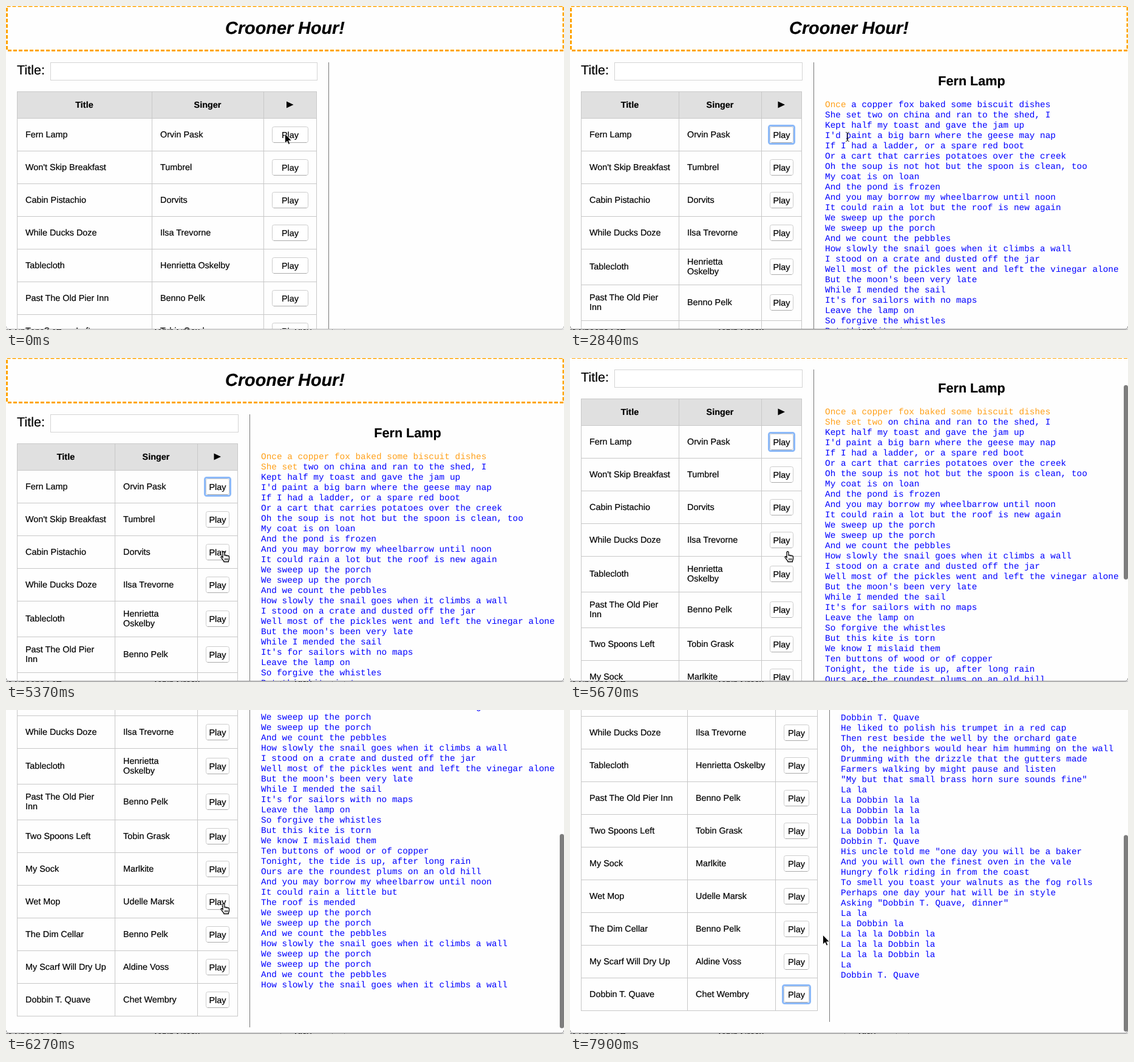
An HTML page for the animation above (8000 ms loop, 919 by 535 pixels).

```html
<!DOCTYPE html>
<html lang="en">
<head>
<meta charset="utf-8">
<title>Crooner Hour!</title>
<style>
  html, body { margin: 0; width: 100%; height: 100%; overflow: hidden; background: #fefefe; }
  svg { display: block; }
  text { font: 14.4px "Liberation Sans", sans-serif; text-rendering: geometricPrecision; stroke: #000; stroke-width: .2; }
  .banner { font-size: 28.8px; font-weight: bold; font-style: italic; }
  .label { font-size: 21.6px; }
  .heading { font-size: 21.6px; font-weight: bold; }
  .th { font-weight: bold; }
  .mid { text-anchor: middle; }
  .lyric { font-family: "Liberation Mono", monospace; fill: #00f; stroke: none; white-space: pre; }
  .sung { fill: #ffa019; }
</style>
</head>
<body>
<svg id="stage" width="919" height="535"></svg>
<script>
const LOOP = 8000, VIEW = 533;

// "|" marks where a cell may wrap in the narrow layout
const songs = [
  ["Fern Lamp", "Orvin Pask"],
  ["Won't Skip Breakfast", "Tumbrel"],
  ["Cabin Pistachio", "Dorvits"],
  ["While Ducks Doze", "Ilsa Trevorne"],
  ["Tablecloth", "Henrietta|Oskelby"],
  ["Past The Old Pier|Inn", "Benno Pelk"],
  ["Two Spoons Left", "Tobin Grask"],
  ["My Sock", "Marlkite"],
  ["Wet Mop", "Udelle Marsk"],
  ["The Dim Cellar", "Benno Pelk"],
  ["My Scarf Will Dry Up", "Aldine Voss"],
  ["Dobbin T. Quave", "Chet Wembry"],
];

const porch = "We sweep up the porch", chorus = [porch, porch, "And we count the pebbles",
  "How slowly the snail goes when it climbs a wall"];
const lampLyrics = [
  "Once a copper fox baked some biscuit dishes",
  "She set two on china and ran to the shed, I",
  "Kept half my toast and gave the jam up",
  "I'd paint a big barn where the geese may nap",
  "If I had a ladder, or a spare red boot",
  "Or a cart that carries potatoes over the creek",
  "Oh the soup is not hot but the spoon is clean, too",
  "My coat is on loan",
  "And the pond is frozen",
  "And you may borrow my wheelbarrow until noon",
  "It could rain a lot but the roof is new again",
  ...chorus,
  "I stood on a crate and dusted off the jar",
  "Well most of the pickles went and left the vinegar alone",
  "But the moon's been very late",
  "While I mended the sail",
  "It's for sailors with no maps",
  "Leave the lamp on",
  "So forgive the whistles",
  "But this kite is torn",
  "We know I mislaid them",
  "Ten buttons of wood or of copper",
  "Tonight, the tide is up, after long rain",
  "Ours are the roundest plums on an old hill",
  "And you may borrow my wheelbarrow until noon",
  "It could rain a little but",
  "The roof is mended",
  ...chorus, ...chorus,
];

const repeat = (n, line) => Array(n).fill(line);
const hero = songs[11][0];
const heroLyrics = [
  ...repeat(11, "La Dobbin la la"),
  hero,
  "He liked to polish his trumpet in a red cap",
  "Then rest beside the well by the orchard gate",
  "Oh, the neighbors would hear him humming on the wall",
  "Drumming with the drizzle that the gutters made",
  "Farmers walking by might pause and listen",
  '"My but that small brass horn sure sounds fine"',
  "La la",
  ...repeat(4, "La Dobbin la la"),
  hero,
  'His uncle told me "one day you will be a baker',
  "And you will own the finest oven in the vale",
  "Hungry folk riding in from the coast",
  "To smell you toast your walnuts as the fog rolls",
  "Perhaps one day your hat will be in style",
  `Asking "${hero}, dinner"`,
  "La la",
  "La Dobbin la",
  ...repeat(3, "La la la Dobbin la"),
  "La",
  hero,
];

const layouts = [
  { cols: [18, 240, 424, 511], button: 60, height: 870 },
  { cols: [18, 179, 315, 381], button: 39, height: 880, wrap: true, playing: 0, lyrics: lampLyrics },
  { cols: [18, 193, 338, 407], button: 42, height: 870, playing: 11, lyrics: heroLyrics },
];

const text = (x, y, str, cls = "") => `<text x="${x}" y="${y}" class="${cls}">${str}</text>`;
const rect = (x, y, w, h, attrs) => `<rect x="${x}" y="${y}" width="${w}" height="${h}" ${attrs}/>`;
const path = (d, color, attrs = "") => `<path d="${d}" fill="none" stroke="${color}" ${attrs}/>`;

function cell(x, mid, str, wrap) {
  const lines = wrap ? str.split("|") : [str.replace("|", " ")];
  return lines.map((line, i) => text(x, mid + 5 + 16 * i - 8 * (lines.length - 1), line)).join("");
}

function playButton(cx, mid, w, focused) {
  const x = Math.round(cx - w / 2), y = mid - 13;
  return (focused ? rect(x - 1.5, y - 1.5, w + 3, 30, 'rx="3" fill="none" stroke="#8cb9f8" stroke-width="3"') : "")
    + rect(x + .5, y + .5, w - 1, 26, 'rx="3" fill="#fff" stroke="#ccc"')
    + path(`M${x + 3} ${y + 26.5}h${w - 6}`, "#aaa")
    + text(x + w / 2, mid + 6, "Play", "mid");
}

function table({ cols, button, wrap, playing }) {
  const [a, b, c, d] = cols, cx = (c + d) / 2;
  let y = 185, lines = `M${a} 141.5H${d + 1}M${a} 185.5H${d + 1}`;
  let out = rect(a, 141, d - a, 44, 'fill="#e0e0e0"')
    + text((a + b) / 2, 168, "Title", "th mid") + text((b + c) / 2, 168, "Singer", "th mid")
    + `<path d="M${cx - 5.5} 157.5l11.5 5.5-11.5 5.5z"/>`;
  songs.forEach(([title, singer], i) => {
    const h = wrap && (title + singer).includes("|") ? 59 : 54, mid = y + Math.floor(h / 2);
    out += cell(a + 14, mid, title, wrap) + cell(b + 14, mid, singer, wrap)
      + playButton(cx, mid, button, i === playing);
    y += h;
    lines += `M${a} ${y + .5}H${d + 1}`;
  });
  cols.forEach(x => lines += `M${x + .5} 141V${y}`);
  return out + path(lines, "#c8c8c8");
}

function lyricSheet({ cols, playing, lyrics }, sung) {
  const x = cols[3] + 39;
  return text((x + 903) / 2, 131, songs[playing][0], "heading mid") + lyrics.map((line, i) => {
    const words = line.split(" "), done = words.slice(0, sung).join(" ");
    sung = Math.max(0, sung - words.length);
    return text(x, 167 + 17 * i, `<tspan class="sung">${done}</tspan>${line.slice(done.length)}`, "lyric");
  }).join("");
}

const pointers = {
  arrow: '<path d="M0 0V15.5L3.6 12.2 5.8 17.4 8.2 16.4 6 11.3H10.8Z" stroke="#fff" stroke-width=".8"/>',
  beam: path("M-3 -7.5Q0 -7.5 0 -5V5Q0 7.5 -3 7.5M3 -7.5Q0 -7.5 0 -5V5Q0 7.5 3 7.5M-2 3H2", "#222"),
  hand: '<path d="M-1.5 10V1.5a1.5 1.5 0 0 1 3 0V7a1.4 1.4 0 0 1 2.7 0a1.4 1.4 0 0 1 2.6.5'
    + 'a1.3 1.3 0 0 1 2.2 1V12c0 2-1.2 2.5-1.2 5H.5c0-2-3-4-4.8-7c-.7-1.6 1-2.2 1.9-1.2z"'
    + ' fill="#fff" stroke="#000" stroke-width="1.3"/>'
    + path("M2.2 11V14.5M4.3 11V14.5M6.4 11V14.5", "#000"),
};

// Pointer stops: [tick, x, y]
const stops = [[1, 457, 216], [11, 457, 216], [16, 358.5, 319.5], [27, 358.5, 319.5],
  [31, 346.5, 432.5], [33, 352, 463], [35, 352, 463], [37, 416.5, 371.5]];

function pointer(t, tick) {
  let kind = "arrow", x = 459.5, y = t < 750 ? 211 : 216;
  if (tick > 0) {
    const n = Math.min(Math.max(1, stops.findIndex(s => s[0] >= tick)), stops.length - 1);
    const [t0, x0, y0] = stops[n - 1], [t1, x1, y1] = stops[n];
    const p = Math.min(1, (tick - t0) / (t1 - t0));
    x = x0 + (x1 - x0) * p;
    y = y0 + (y1 - y0) * p;
    if (tick < 14) kind = "beam";
    else if ((tick > 15 && tick < 28) || (tick > 32 && tick < 36)) kind = "hand";
  }
  return `<g transform="translate(${x} ${y})">${pointers[kind]}</g>`;
}

function windowEdge(active) {
  return `<svg y="${VIEW}" width="919" height="2">`
    + rect(0, 0, 919, 2, `fill="${active ? "#cfcfcf" : "#e2e2e2"}"`)
    + text(-16, 8.6, songs[6][0]) + text(242, 8.6, songs[6][1]) + text(475, 8.6, "Play")
    + path("M452.5 0v2M537.5 0v2M557.5 0v2", "#888") + "</svg>"
    + path("M.5 529q0 4.5 4.5 4.5H914q4.5 0 4.5-4.5", active ? "#8c8c8c" : "#b8b8b8");
}

const scrollSteps = [0, 22, 74, 152, 235, 300, 338, 347];

function render(t) {
  const tick = Math.floor((t - 2390) / 148.5);
  const layout = layouts[tick < 0 ? 0 : tick < 35 ? 1 : 2], right = layout.cols[3];
  const scroll = tick < 20 ? 0 : Math.min(scrollSteps[Math.min(tick - 20, 7)], layout.height - VIEW);
  // one word every two ticks
  const sung = tick < 35 ? tick >> 1 : 0;
  const page = rect(1.5, 0, 916.5, 73.5, 'fill="none" stroke="orange" stroke-width="3" stroke-dasharray="6 3"')
    + text(459.5, 46, "Crooner Hour!", "banner mid")
    + text(18, 113, "Title:", "label")
    + rect(73.5, 93.5, right - 72, 29, 'fill="#fff" stroke="#d4d4d4"')
    + table(layout)
    + path(`M${right + 20.5} 93V${layout.height - 18}`, "#777")
    + (layout.lyrics ? lyricSheet(layout, sung) : "");
  const scale = VIEW / layout.height;
  return `<svg width="919" height="${VIEW}"><g transform="translate(0 ${-scroll})">${page}</g>`
    + (tick > 20 ? rect(912, scroll * scale, 7, VIEW * scale - 2, 'rx="3.5" fill="#7d7d7d"') : "")
    + "</svg>" + windowEdge(t >= 1800) + pointer(t, tick);
}

const stage = document.getElementById("stage");
let shown = "";
function draw() {
  const markup = render(performance.now() % LOOP);
  if (markup !== shown) stage.innerHTML = shown = markup;
  requestAnimationFrame(draw);
}
draw();
</script>
</body>
</html>
```
